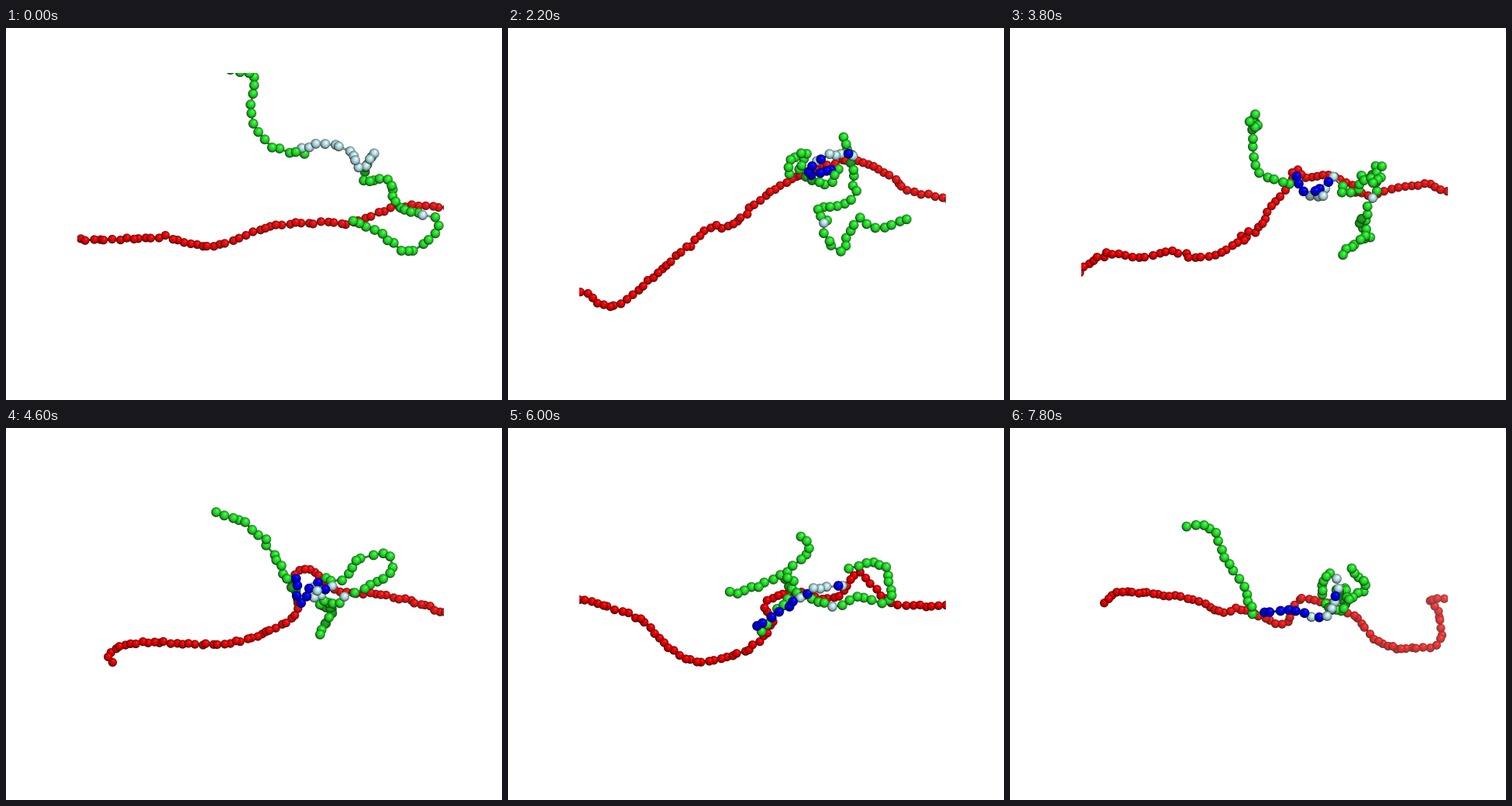
Animation of 640x480 px, one loop 8 s. Source, as a matplotlib script:

```python
import numpy as np
import matplotlib.pyplot as plt
from matplotlib.animation import FuncAnimation

W, H = 640, 480
FRAMES, STEP = 40, 200
LEFT, RIGHT, TOP, BOTTOM = 92, 565, 58, 428
N_RED = 78
PARTS = dict(tail=16, bind=13, mid=17, site=1, end=15)
BIND = range(16, 29)
BINDERS = [16, 17, 18, 19, 20, 21, 23, 27]  # turn blue close to the red chain
SITE = 46
RED, GREEN = (1, 0, 0), (0.18, 0.98, 0.2)
PALE, BLUE = (0.8, 0.98, 1), (0, 0, 1)
LIGHT = np.array([0.3, -0.4, 1.0])
LIGHT /= np.linalg.norm(LIGHT)

poses = []


def curve(knots):
    """Dense Catmull-Rom curve through a few knots."""
    k = np.array(knots, float)
    k = np.vstack([2 * k[0] - k[1], k, 2 * k[-1] - k[-2]])
    t = np.linspace(0, 1, 20, endpoint=False)[:, None]
    runs = [b + t / 2 * (c - a + t * (2 * a - 5 * b + 4 * c - d
                                      + t * (3 * (b - c) + d - a)))
            for a, b, c, d in zip(k, k[1:], k[2:], k[3:])]
    return np.vstack(runs + [k[-2:-1]])


def string(knots, n, rough, rng):
    """Thread n beads on a curve with uneven gaps and a slight zigzag."""
    if n == 1:
        return np.array(knots, float)
    p = curve(knots)
    s = np.r_[0, np.cumsum(np.hypot(*np.diff(p, axis=0).T))]
    u = np.r_[0, np.cumsum(rng.uniform(0.75, 1.25, n - 1))]
    u *= s[-1] / u[-1]
    beads = np.column_stack([np.interp(u, s, c) for c in p.T])
    return beads + rng.normal(0, rough, beads.shape)


def pose(at, red, sag=0, haze=0.1, **parts):
    rng = np.random.default_rng(at)
    green = [string(parts[k], n, 1.3, rng) for k, n in PARTS.items()]
    poses.append(dict(at=at, red=string(red, N_RED, 0.9, rng),
                      green=np.vstack(green), sag=sag, haze=haze))


pose(0,
     red=[(5, 266), (120, 273), (200, 270), (265, 281), (342, 256), (408, 250),
          (450, 250), (516, 229), (645, 240)],
     tail=[(290, 54), (318, 64), (317, 118), (345, 154), (385, 160)],
     bind=[(382, 155), (411, 147), (447, 160), (455, 181), (476, 163)],
     mid=[(470, 166), (461, 198), (490, 193), (506, 230), (530, 238)],
     site=[(537, 241)],
     end=[(552, 244), (556, 262), (520, 288), (480, 261), (446, 251)])

pose(4,
     red=[(20, 298), (92, 296), (150, 302), (220, 292), (262, 250), (326, 238),
          (395, 236), (415, 225), (455, 234), (480, 223), (645, 228)],
     tail=[(322, 60), (312, 72), (320, 106), (348, 99), (400, 143)],
     bind=[(409, 152), (412, 192), (428, 180), (430, 207)],
     mid=[(427, 198), (462, 193), (506, 228), (530, 254), (575, 258)],
     site=[(565, 272)],
     end=[(552, 270), (537, 268), (530, 288), (512, 270), (524, 308)])

pose(11, sag=75,
     red=[(50, 345), (95, 341), (135, 359), (190, 318), (260, 258), (288, 254),
          (345, 206), (435, 170), (490, 189), (520, 211), (600, 225)],
     tail=[(362, 187), (364, 170), (388, 163), (376, 184), (410, 201), (427, 184)],
     bind=[(416, 183), (387, 188), (405, 166), (444, 163)],
     mid=[(432, 140), (444, 175), (442, 222), (400, 233), (412, 247)],
     site=[(407, 251)],
     end=[(407, 264), (426, 287), (450, 247), (472, 258), (514, 247)])

pose(15,
     red=[(50, 318), (118, 320), (190, 312), (261, 281), (300, 232), (336, 209),
          (360, 185), (420, 194), (450, 210), (525, 179), (610, 184)],
     tail=[(356, 142), (314, 128), (294, 145), (300, 176), (342, 190)],
     bind=[(349, 199), (380, 208), (412, 226), (405, 194)],
     mid=[(417, 211), (440, 236), (452, 193), (474, 209), (490, 226)],
     site=[(490, 234)],
     end=[(483, 247), (509, 280), (490, 294), (460, 293), (457, 319)])

pose(23, sag=50,
     red=[(136, 302), (134, 290), (175, 276), (285, 277), (370, 244), (372, 195),
          (389, 181), (430, 210), (500, 217), (600, 250)],
     tail=[(271, 109), (313, 126), (347, 165), (372, 211)],
     bind=[(373, 194), (380, 223), (403, 200), (398, 220), (421, 202)],
     mid=[(412, 194), (437, 195), (452, 172), (488, 161), (496, 185), (449, 212)],
     site=[(436, 217)],
     end=[(428, 226), (403, 226), (422, 236), (403, 264)])

pose(30, haze=0,
     red=[(70, 215), (120, 228), (172, 248), (210, 286), (248, 300), (306, 287),
          (341, 252), (331, 228), (366, 211), (422, 219), (452, 189), (498, 226),
          (590, 228)],
     tail=[(377, 138), (388, 160), (358, 188), (368, 205), (327, 261)],
     bind=[(323, 256), (363, 228), (392, 208), (432, 202)],
     mid=[(440, 181), (470, 172), (490, 190), (490, 225), (450, 218), (431, 230)],
     site=[(418, 230)],
     end=[(405, 226), (368, 208), (352, 190), (318, 207), (286, 211)])

pose(39, haze=0.25,
     red=[(122, 225), (145, 211), (230, 219), (272, 237), (300, 233), (353, 253),
          (375, 219), (438, 238), (480, 278), (548, 280), (553, 240), (541, 223),
          (559, 220)],
     tail=[(228, 124), (262, 132), (276, 165), (298, 200), (313, 241)],
     bind=[(328, 239), (371, 236), (405, 245), (424, 207)],
     mid=[(430, 205), (432, 232), (411, 231), (402, 200), (412, 187)],
     site=[(421, 194)],
     end=[(441, 181), (457, 206), (428, 221), (420, 209), (437, 222)])


def bonds(p):
    return np.hypot(*np.diff(p, axis=0).T)


def drift(a, b, s, rng):
    """Blend two chain shapes, adding thermal motion that vanishes at both."""
    p = (1 - s) * a + s * b
    if s == 0:
        return p
    soft = np.hanning(11) / np.hanning(11).sum()
    noise = rng.normal(0, 1, p.shape)
    slow = np.column_stack([np.convolve(c, soft, "same") for c in noise.T])
    p += np.sin(np.pi * s) * (12 * slow + 1.2 * noise)
    goal = (1 - s) * bonds(a) + s * bonds(b)
    for _ in range(20):
        fix = np.diff(p, axis=0) * (1 - goal / np.maximum(bonds(p), 0.5))[:, None] / 4
        p[:-1] += fix
        p[1:] -= fix
    return p


def state(i):
    k = max(j for j, q in enumerate(poses) if q["at"] <= i)
    a, b = poses[k], poses[min(k + 1, len(poses) - 1)]
    s = (i - a["at"]) / max(b["at"] - a["at"], 1)
    rng = np.random.default_rng(100 + i)
    red = drift(a["red"], b["red"], s, rng)
    green = drift(a["green"], b["green"], s, rng)
    u = np.linspace(0, 1, N_RED)
    red[:, 1] += a["sag"] * np.sin(np.pi * s) ** 4 * (1 - u) ** 3
    return red, green, ((1 - s) * a["haze"] + s * b["haze"]) * u


def ball(img, x, y, r, color, shade=1.0, haze=0.0):
    x0, y0, n = int(x - r - 1), int(y - r - 1), int(2 * r) + 4
    if x0 < 0 or y0 < 0 or x0 + n > W or y0 + n > H:
        return
    gx = (np.arange(n) + x0 - x)[None, :] / r
    gy = (np.arange(n) + y0 - y)[:, None] / r
    d2 = gx ** 2 + gy ** 2
    nz = np.sqrt(np.clip(1 - d2, 0, 1))
    lit = np.clip(gx * LIGHT[0] + gy * LIGHT[1] + nz * LIGHT[2], 0, 1)
    body = 0.14 + 0.42 * nz + 0.42 * lit * shade
    rgb = body[..., None] * np.array(color) + (0.18 * shade * lit ** 40)[..., None]
    rgb = np.clip(rgb, 0, 1) * (1 - haze) + haze
    alpha = np.clip((1 - np.sqrt(d2)) * r + 0.5, 0, 1)[..., None]
    patch = img[y0:y0 + n, x0:x0 + n]
    patch += alpha * (rgb - patch)


def chain(img, pts, radius, colors, depth, haze):
    gaps = bonds(pts)
    for j in np.flatnonzero((gaps > 1.7 * radius) & (gaps < 22)):
        for t in np.linspace(0.3, 0.7, 6):
            ball(img, *((1 - t) * pts[j] + t * pts[j + 1]), 1.3, colors[j], 0.7)
    # A bead is in shadow when a nearer one, not its neighbour, covers its lit side.
    off = pts[None] - (pts + [2, -3])[:, None]
    covers = np.hypot(off[..., 0], off[..., 1]) < radius
    k = np.arange(len(pts))
    apart = abs(k[None] - k[:, None]) > 1
    shaded = (covers & apart & (depth[None] > depth[:, None])).any(axis=1)
    for j in np.argsort(depth):
        ball(img, *pts[j], radius, colors[j], 0.25 if shaded[j] else 1.0, haze[j])


def render(i):
    red, green, haze = state(i)
    img = np.ones((H, W, 3))
    k = np.arange(N_RED)
    chain(img, red, 5.6, [RED] * N_RED, np.sin(0.35 * k) + 0.3 * np.sin(2.1 * k), haze)

    colors = [GREEN] * len(green)
    for j in [*BIND, SITE]:
        reach = np.hypot(*(red - green[j]).T).min()
        colors[j] = BLUE if j in BINDERS and reach < 24 else PALE
    g = np.arange(len(green))
    depth = np.sin(0.3 * g + 1) + 0.3 * np.sin(1.9 * g)
    depth[SITE] += 2
    chain(img, green, 6.3, colors, depth, 0 * g)

    view = np.ones_like(img)
    box = slice(TOP, BOTTOM), slice(LEFT, RIGHT)
    view[box] = img[box]
    return np.clip(view, 0, 1)


fig = plt.figure(figsize=(W / 100, H / 100), dpi=100, facecolor="white")
ax = fig.add_axes([0, 0, 1, 1])
ax.axis("off")
picture = ax.imshow(render(0), interpolation="nearest", aspect="auto")


def draw(i):
    picture.set_data(render(i))
    return [picture]


anim = FuncAnimation(fig, draw, frames=FRAMES, interval=STEP,
                     init_func=lambda: draw(0), repeat=True, repeat_delay=0)
plt.show()
```
